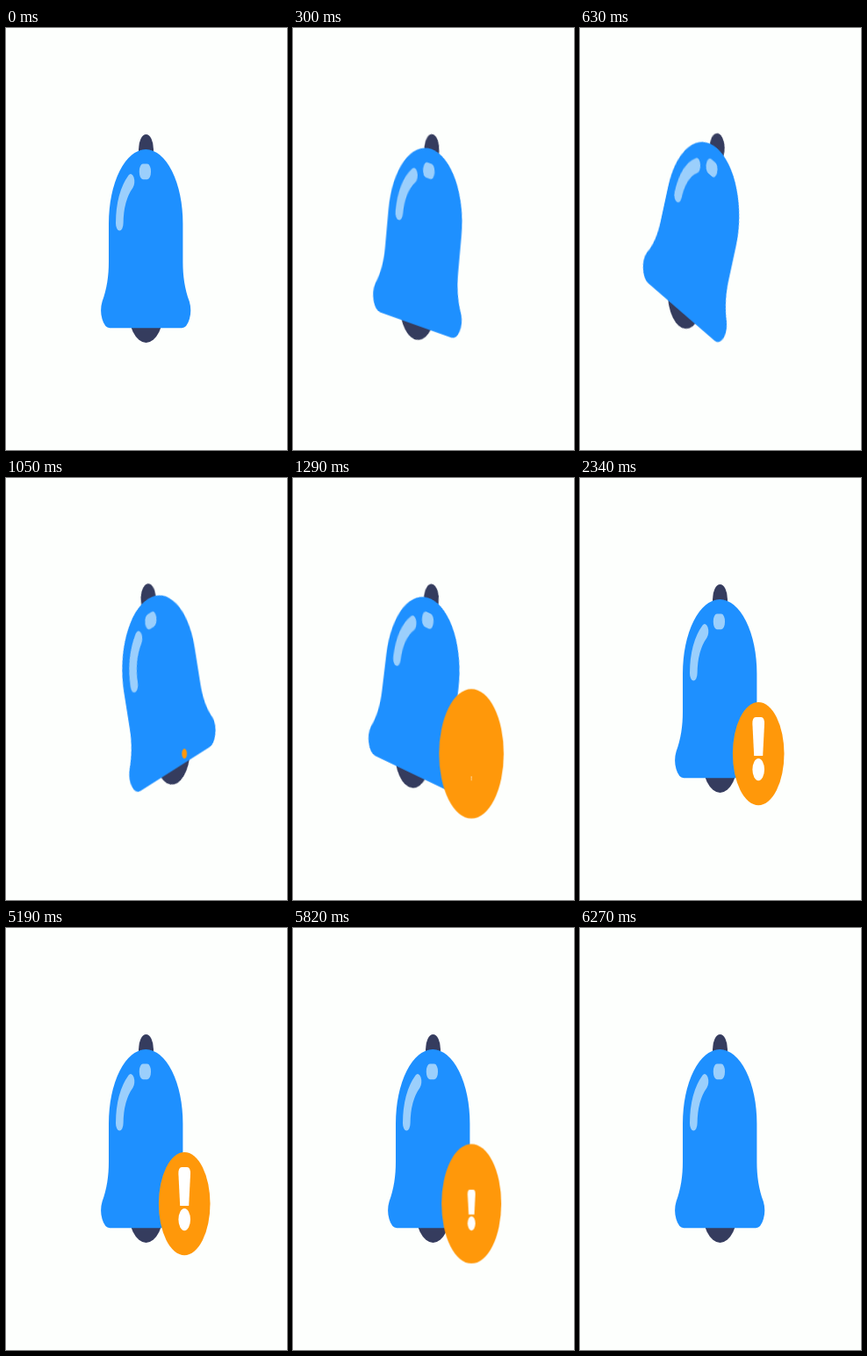
An HTML page for the animation above (6300 ms loop, 320x480 px).

```html
<!DOCTYPE html>
<html lang="en">
<head>
<meta charset="utf-8">
<title>Ringing bell</title>
<style>
  html, body {
    margin: 0;
    width: 100%;
    height: 100%;
    overflow: hidden;
    background: #fdfffd;
  }
  svg { display: block; width: 100%; height: 100%; }

  .bell, .badge, .mark {
    animation: 6300ms cubic-bezier(.333, 0, .667, 1) infinite;
  }
  .bell { animation-name: swing; transform-origin: 159.4px 60.5px; }
  .badge { animation-name: pop; transform-origin: 203.2px 156.8px; }
  .mark { animation-name: grow; transform-origin: 203.2px 172px; }

  @keyframes swing {
    0% { transform: rotate(0deg); }
    10.58% { transform: rotate(23.6deg); }
    15.87% { transform: rotate(-19.8deg); }
    21.16% { transform: rotate(15deg); }
    26.46% { transform: rotate(-10deg); }
    31.75%, 100% { transform: rotate(0deg); }
  }
  @keyframes pop {
    0%, 15.87% { transform: scale(0); }
    20.63% { transform: scale(1.26); }
    26.98%, 89.8% { transform: scale(1); }
    94.3% { transform: scale(1.26); }
    99.3%, 100% { transform: scale(0); }
  }
  @keyframes grow {
    0%, 19.68% { transform: scale(0); }
    24.9%, 90.3% { transform: scale(1); }
    95.5%, 100% { transform: scale(0); }
  }
</style>
</head>
<body>
<!-- The artwork is 320 x 240, stretched to twice its height. -->
<svg viewBox="0 0 320 240" preserveAspectRatio="none">
  <g class="bell">
    <g fill="#353c5e">
      <rect x="151" y="60.5" width="17" height="24" rx="8.5"/>
      <circle cx="159.5" cy="158" r="21"/>
    </g>
    <path fill="#1e90ff" d="M117 111.2a42.2 42.2 0 0 1 84.4 0V133
      C201.4 141 203.5 148.500 208.800 155.500A10 10 0 0 1 200.200 170.600H118.200
      A10 10 0 0 1 109.600 155.500C114.900 148.500 117 141 117 133Z"/>
    <path fill="none" stroke="#9bcffc" stroke-width="8.600" stroke-linecap="round"
      d="M142 87.300Q129.500 96 129.300 111"/>
    <rect x="151.800" y="77.300" width="13.200" height="8.800" rx="4.200" fill="#9bcffc"/>
  </g>
  <circle class="badge" cx="203.2" cy="156.8" r="29.3" fill="#ff980a"/>
  <g class="mark" fill="#fff">
    <path d="M200.200 136H206.200Q210.200 136 210 140L208.200 158H198.200L196.400 140Q196.200 136 200.200 136Z"/>
    <ellipse cx="203.200" cy="165.800" rx="6.800" ry="6.300"/>
  </g>
</svg>
</body>
</html>
```
